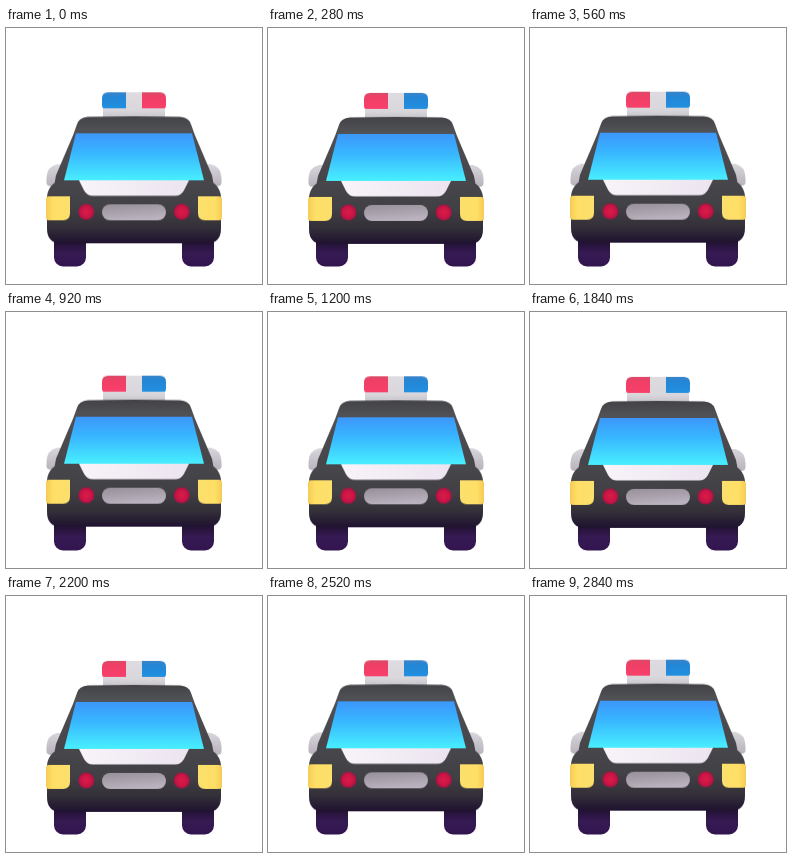
An HTML page that plays this animation: 256x256 px, repeating every 2.88 s.

```html
<!DOCTYPE html>
<html lang="en">
<head>
<meta charset="utf-8">
<title>Police car</title>
<style>
html, body { margin: 0; width: 100%; height: 100%; overflow: hidden; background: #fff; }
svg { display: block; width: 100vw; height: 100vh; }
</style>
</head>
<body>
<svg viewBox="0 0 256 256">
  <defs>
    <linearGradient id="tyre" x2="0" y2="1">
      <stop offset=".4" stop-color="#20112f"/><stop offset=".7" stop-color="#361a54"/><stop offset="1" stop-color="#32154f"/>
    </linearGradient>
    <linearGradient id="roof" x2="0" y2="1">
      <stop offset="0" stop-color="#434347"/><stop offset=".2" stop-color="#505155"/><stop offset="1" stop-color="#454448"/>
    </linearGradient>
    <linearGradient id="hull" x2="0" y2="1">
      <stop offset="0" stop-color="#48474b"/><stop offset=".45" stop-color="#414044"/>
      <stop offset=".75" stop-color="#343039"/><stop offset="1" stop-color="#1f1230"/>
    </linearGradient>
    <linearGradient id="glass" x2="0" y2="1">
      <stop offset="0" stop-color="#3d97fb"/><stop offset=".4" stop-color="#38b5ff"/>
      <stop offset="1" stop-color="#48efff"/>
    </linearGradient>
    <linearGradient id="hood">
      <stop offset="0" stop-color="#f8f4f9"/><stop offset="1" stop-color="#ece4f0"/>
    </linearGradient>
    <linearGradient id="lamp">
      <stop offset="0" stop-color="#f6cb55"/><stop offset=".3" stop-color="#ffdf66"/><stop offset="1" stop-color="#fbe06d"/>
    </linearGradient>
    <linearGradient id="grille" x2=".3" y2="1">
      <stop offset="0" stop-color="#98919c"/><stop offset=".5" stop-color="#a8a1ac"/><stop offset="1" stop-color="#bab3bf"/>
    </linearGradient>
    <linearGradient id="mirror" x2="0" y2="1">
      <stop offset="0" stop-color="#d9d6dc"/><stop offset="1" stop-color="#b8b3bc"/>
    </linearGradient>
    <linearGradient id="base" x2="0" y2="1">
      <stop offset="0" stop-color="#dedce1"/><stop offset=".7" stop-color="#d9d6dc"/><stop offset="1" stop-color="#c6c2ca"/>
    </linearGradient>
    <linearGradient id="blue" x2="0" y2="1">
      <stop offset="0" stop-color="#3a84c8"/><stop offset=".3" stop-color="#2486d6"/><stop offset="1" stop-color="#2290e0"/>
    </linearGradient>
    <linearGradient id="red" x2="0" y2="1">
      <stop offset="0" stop-color="#dc4a68"/><stop offset=".3" stop-color="#f03f66"/><stop offset="1" stop-color="#f8406a"/>
    </linearGradient>
    <radialGradient id="dot">
      <stop offset="0" stop-color="#dc1c48"/><stop offset=".7" stop-color="#c81545"/><stop offset="1" stop-color="#a01443"/>
    </radialGradient>
    <path id="leftLight" d="M98 80Q96 80 96 77V70Q96 64 102 64H120V80Z"/>
    <path id="rightLight" d="M158 80Q160 80 160 77V70Q160 64 154 64H136V80Z"/>
    <path id="sideMirror" d="M56 136H51Q41 138 40.5 150V155Q41 158 45 158H56Z"/>
    <path id="headlight" d="M43 168H64V185Q64 192 57 192H43Q40 192 40 189V171Q40 168 43 168Z"/>
  </defs>

  <g fill="url(#tyre)">
    <rect x="48" y="195" width="32" height="43.5" rx="9"/>
    <rect x="176" y="195" width="32" height="43.5" rx="9"/>
  </g>

  <g id="car">
    <path d="M97 76H120V64H136V76H159V90H97Z" fill="url(#base)"/>
    <g id="blueFirst">
      <use href="#leftLight" fill="url(#blue)"/>
      <use href="#rightLight" fill="url(#red)"/>
    </g>
    <g id="redFirst" opacity="0">
      <use href="#leftLight" fill="url(#red)"/>
      <use href="#rightLight" fill="url(#blue)"/>
    </g>

    <g fill="url(#mirror)">
      <use href="#sideMirror"/>
      <use href="#sideMirror" transform="matrix(-1 0 0 1 256 0)"/>
    </g>

    <path d="M71 96Q73 89 82 88.5Q128 87.5 174 88.5Q183 89 185 96L189 107L206 147L208 158H48L50 147L67 107Z" fill="url(#roof)"/>
    <path d="M56 152H200Q213 154 215 168V200Q215 215 201 215H55Q41 215 41 200V168Q43 154 56 152Z" fill="url(#hull)"/>
    <path d="M70 105H186L198 152H58Z" fill="url(#glass)"/>
    <path d="M73 152H183L178 162Q175 167.500 169 167.500H87Q81 167.500 78 162Z" fill="url(#hood)"/>

    <g fill="url(#lamp)">
      <use href="#headlight"/>
      <use href="#headlight" transform="matrix(-1 0 0 1 256 0)"/>
    </g>
    <rect x="96" y="176" width="64" height="16" rx="8" fill="url(#grille)"/>
    <g fill="url(#dot)">
      <circle cx="80.300" cy="183.500" r="8"/>
      <circle cx="175.700" cy="183.500" r="8"/>
    </g>
  </g>
</svg>
<script>
const TICK = 40, SHAKE_TICKS = 3, FLASH_TICKS = 4;
const hold = 'steps(1, end)';

function play(id, frames, ticks) {
  const part = document.getElementById(id);
  const animation = part.animate(frames, { duration: ticks * TICK, iterations: Infinity });
  animation.startTime = document.timeline.currentTime;
}

// The body rattles on its springs while the wheels stay put.
const shake = Array.from({ length: SHAKE_TICKS + 1 }, (_, i) => ({
  transform: `translateY(${(0.3 + 0.7 * Math.sin(i / SHAKE_TICKS * 2 * Math.PI)).toFixed(2)}px)`,
  easing: hold
}));

const flash = (first, second) => [
  { opacity: first, offset: 0, easing: hold },
  { opacity: second, offset: 0.5, easing: hold },
  { opacity: second, offset: 1 }
];

play('car', shake, SHAKE_TICKS);
play('blueFirst', flash(1, 0), FLASH_TICKS);
play('redFirst', flash(0, 1), FLASH_TICKS);
</script>
</body>
</html>
```
